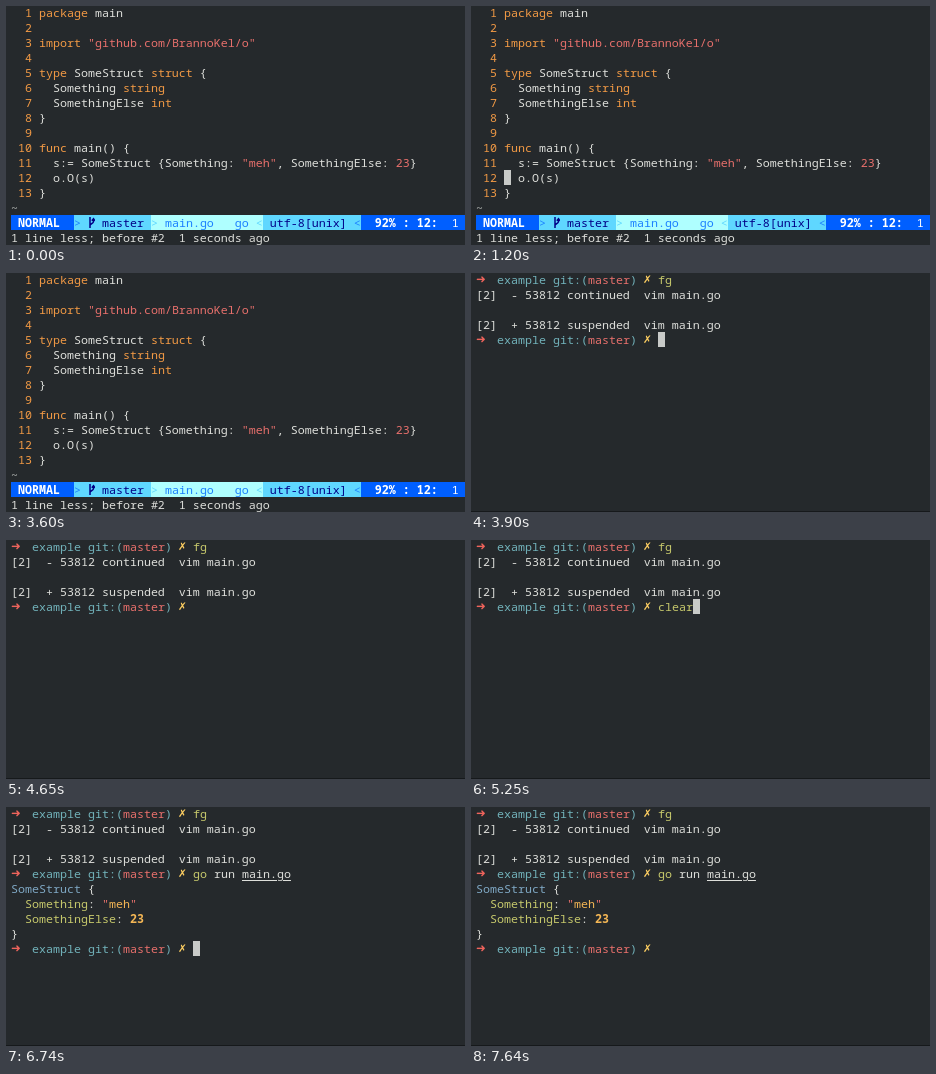
Write an HTML page that moves like this. It is 459 px wide and 239 px high and loops after 8000 ms.

```html
<!DOCTYPE html>
<html lang="en">
<head>
<meta charset="utf-8">
<title>Go struct printing in the terminal</title>
<style>
  html, body { margin: 0; width: 100%; height: 100%; overflow: hidden; background: #25292c; }
  #stage { position: relative; width: 459px; height: 239px; overflow: hidden; }

  /* Character cells are 7 by 15 px; the grid starts at (5, -1). */
  pre {
    position: absolute; left: 5px; top: -1px; margin: 0;
    font: 500 11.667px/15px "Noto Sans Mono", monospace;
    font-variant-ligatures: none;
    color: #dedfdb;
  }
  b { font-weight: 700; }
  i { font-style: normal; }
  u { text-underline-offset: 2px; text-decoration-thickness: 1px; }

  .k { color: #f29a45; }
  .s { color: #e8706c; }
  .c { color: #72b3bb; }
  .n { color: #7fa8c4; }
  .y { color: #c7c96c; }
  .g { color: #f5b755; }
  .dim { color: #b4b7b5; }
  .arrow, .cross {
    position: absolute;
    font: 700 11.667px/15px "DejaVu Sans", sans-serif;
  }
  .arrow { color: #ef645c; }
  .cross { color: #ffd062; font-size: 10.5px; margin-left: -1px; }

  .bar {
    position: absolute; left: 5px; top: 209px; width: 454px; height: 15px;
    background: linear-gradient(90deg,
      #005fff 63px, #5fd7ff 0 140px, #afffff 0 252px, #5fd7ff 0 350px, #005fff 0);
  }
  .white { color: #fff; }
  .navy { color: #000087; }
  .blue { color: #1c80ff; }
  .sky { color: #5fd7ff; }
  .branch { position: absolute; left: 82px; top: 209px; }
  .edge { position: absolute; left: 0; top: 238px; width: 459px; height: 1px; background: #16191b; }

  #cursor {
    position: absolute; left: 0; top: 0; width: 7px; height: 15px;
    background: #c8cac8; animation: cursor 8s step-end infinite;
  }
  #editor { animation: editor 8s step-end infinite; }
  #shell { animation: shell 8s step-end infinite; }
  .cmd { left: 187px; top: 59px; }
  #cmd1 { animation: cmd1 8s step-end infinite; }
  #cmd2 { animation: cmd2 8s step-end infinite; }
  #cmd3 { animation: cmd3 8s step-end infinite; }
  #output { top: 74px; animation: output 8s step-end infinite; }

  @keyframes editor { 0% { opacity: 1; } 48.75%, to { opacity: 0; } }
  @keyframes shell { 0% { opacity: 0; } 48.75%, to { opacity: 1; } }
  @keyframes cmd1 { 0%, 65.625%, to { opacity: 0; } 60% { opacity: 1; } }
  @keyframes cmd2 { 0%, 69.375%, to { opacity: 0; } 65.625% { opacity: 1; } }
  @keyframes cmd3 { 0% { opacity: 0; } 69.375%, to { opacity: 1; } }
  @keyframes output { 0% { opacity: 0; } 84.25%, to { opacity: 1; } }
  @keyframes cursor {
    0%, 7.5%, 20.625%, 33.75%, 45% { opacity: 0; transform: translate(33px, 164px); }
    1.875%, 15%, 26.25%, 39.375% { opacity: 1; transform: translate(33px, 164px); }
    48.75% { opacity: 1; transform: translate(187px, 59px); }
    58.125% { opacity: 0; transform: translate(187px, 59px); }
    60% { opacity: 1; transform: translate(201px, 59px); }
    65.625% { opacity: 1; transform: translate(222px, 59px); }
    69.375% { opacity: 1; transform: translate(285px, 59px); }
    80.5% { opacity: 1; transform: translate(5px, 74px); }
    84.25% { opacity: 1; transform: translate(187px, 134px); }
    95.5%, to { opacity: 0; transform: translate(187px, 134px); }
  }
</style>
</head>
<body>
<div id="stage">
  <div id="editor">
    <div class="bar"></div>
    <svg class="branch" width="7" height="15" fill="none" stroke="#000087" stroke-width="1.5">
      <path d="M2 2V13M2 10.5C2 8.5 5.5 9 5.5 6.5V4M3.8 5.8L5.5 3.8L7 5.8"/>
    </svg>
<pre>
<i class="k">  1 package</i> main
<i class="k">  2</i>
<i class="k">  3 import</i> <i class="s">"github.com/BrannoKel/o"</i>
<i class="k">  4</i>
<i class="k">  5 type</i> SomeStruct <i class="k">struct</i> {
<i class="k">  6</i>   Something <i class="k">string</i>
<i class="k">  7</i>   SomethingElse <i class="k">int</i>
<i class="k">  8</i> }
<i class="k">  9</i>
<i class="k"> 10 func</i> main() {
<i class="k"> 11</i>   s:= SomeStruct {Something: <i class="s">"meh"</i>, SomethingElse: <i class="s">23</i>}
<i class="k"> 12</i>   o.O(s)
<i class="k"> 13</i> }
<i class="dim">~</i>
<b class="white"> NORMAL  </b><i class="blue">&gt;</i>   <i class="navy">master</i> <i class="sky">&gt;</i> <i class="blue">main.go   go</i> <i class="sky">&lt;</i> <i class="navy">utf-8[unix]</i> <i class="blue">&lt;</i>  <b class="white">92% : 12:</b><i class="white">  1</i>
1 line less; before #2  1 seconds ago</pre>
  </div>

  <div id="shell">
<pre>
<i class="arrow">➜</i>   <i class="c">example</i> <i class="c">git:(</i><i class="s">master</i><i class="c">)</i> <i class="cross">✗</i>  <i class="y">fg</i>
[2]  - 53812 continued  vim main.go

[2]  + 53812 suspended  vim main.go
<i class="arrow">➜</i>   <i class="c">example</i> <i class="c">git:(</i><i class="s">master</i><i class="c">)</i> <i class="cross">✗</i></pre>
    <div class="edge"></div>
  </div>

  <pre class="cmd" id="cmd1"><i class="y">fg</i></pre>
  <pre class="cmd" id="cmd2"><i class="y">clear</i></pre>
  <pre class="cmd" id="cmd3"><i class="y">go</i> run <u>main.go</u></pre>
<pre id="output">
<i class="n">SomeStruct</i> {
  <i class="y">Something</i>: <i class="s">"</i><i class="g">meh</i><i class="s">"</i>
  <i class="y">SomethingElse</i>: <b class="g">23</b>
}
<i class="arrow">➜</i>   <i class="c">example</i> <i class="c">git:(</i><i class="s">master</i><i class="c">)</i> <i class="cross">✗</i></pre>
  <div id="cursor"></div>
</div>
</body>
</html>
```
